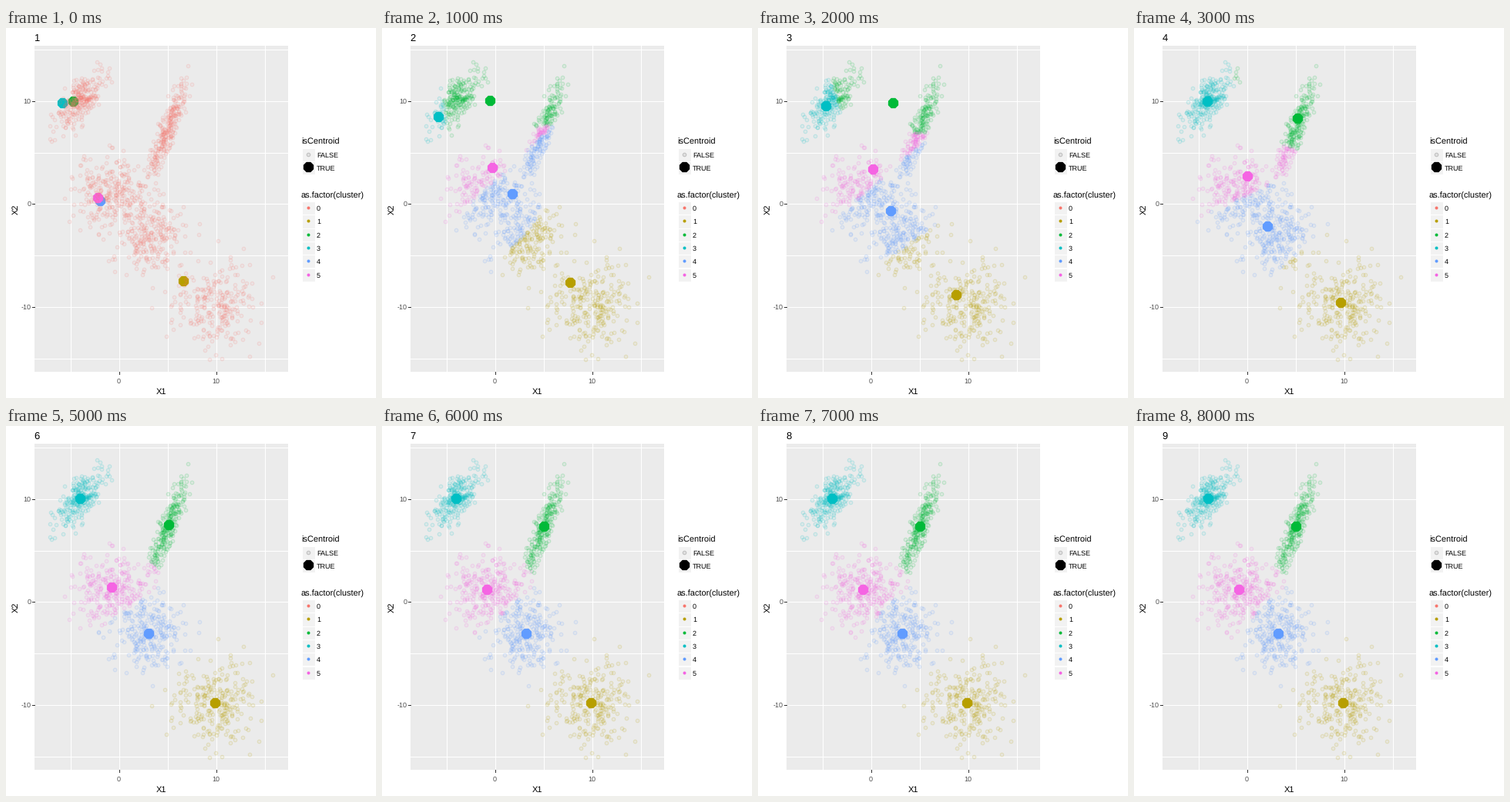
Recreate the animation shown at these times as a matplotlib script. Size 480 by 480 pixels, loop 9 s.

```python
import numpy as np
import matplotlib.pyplot as plt
from matplotlib.animation import FuncAnimation
from matplotlib.colors import to_rgba
from matplotlib.patches import Rectangle

plt.rcParams["font.family"] = "Liberation Sans"
plt.rcParams["text.hinting"] = "none"

SIZE, DPI = 480, 100
PT = 72 / DPI
STEPS = 9
COLORS = ["#F8766D", "#B79F00", "#00BA38", "#00BFC4", "#619CFF", "#F564E3"]

PER_BLOB = 270
# mean x, mean y, sd x, sd y, correlation
BLOBS = [
    (9.9, -9.85, 2.1, 2.05, 0.0),
    (4.99, 7.08, 1.0, 2.25, 0.87),
    (-3.96, 10.0, 1.2, 1.35, 0.67),
    (3.09, -3.11, 1.75, 1.7, 0.0),
    (-0.87, 1.16, 1.8, 1.6, 0.0),
]
START = [(6.65, -7.53), (-4.67, 9.93), (-5.78, 9.78), (-1.87, 0.26), (-2.14, 0.56)]


def make_blob(rng, mx, my, sx, sy, rho):
    z = rng.normal(size=(PER_BLOB * 2, 2))
    z = z[np.hypot(*z.T) < 2.95][:PER_BLOB]
    z = (z - z.mean(axis=0)) / z.std(axis=0)
    x = mx + sx * z[:, 0]
    y = my + sy * (rho * z[:, 0] + np.sqrt(1 - rho**2) * z[:, 1])
    return np.column_stack([x, y])


def k_means(points, centers):
    """Labels and centroids of every step; step 0 is still unlabelled."""
    history = [(np.zeros(len(points), int), np.array(centers))]
    for _ in range(STEPS - 1):
        gap = points[:, None] - history[-1][1][None]
        near = (gap**2).sum(axis=2).argmin(axis=1)
        means = [points[near == k].mean(axis=0) for k in range(len(centers))]
        history.append((near + 1, np.array(means)))
    return history


def to_px(p):
    p = np.asarray(p, float)
    px = np.column_stack([146.4 + 12.63 * p[:, 0], 227.8 - 13.35 * p[:, 1]])
    return np.floor(px) + 0.5


def area(diameter):
    return (diameter * PT) ** 2


def tints(color):
    """Faint fill and stronger rim of a data point."""
    return to_rgba(color, 0.07), to_rgba(color, 0.18)


def text(x, y, s, size, color="black", ha="left", **kw):
    return ax.text(x, y, s, fontsize=size * PT, color=color, ha=ha, **kw)


def line(xs, ys, color):
    ax.plot(xs, ys, color=color, lw=PT, antialiased=False,
            solid_capstyle="butt", zorder=1)


def legend_row(y, label):
    ax.add_patch(Rectangle((383.5, y - 8.6), 17.2, 17.2, fc="#F2F2F2",
                           ec="white", lw=PT, zorder=1))
    text(403, y + 3.5, label, 9)


def big_dots(xy, color):
    return ax.scatter(*np.transpose(xy), s=area(14.4), c=color, marker="8",
                      lw=0, zorder=4)


rng = np.random.default_rng(11)
points = rng.permutation(np.vstack([make_blob(rng, *b) for b in BLOBS]))
history = k_means(points, START)

fig = plt.figure(figsize=(SIZE / DPI, SIZE / DPI), dpi=DPI, facecolor="white")
ax = fig.add_axes([0, 0, 1, 1])
ax.set(xlim=(0, SIZE), ylim=(SIZE, 0))
ax.axis("off")

# panel, grid and axes
ax.add_patch(Rectangle((37, 23), 329, 423, fc="#EBEBEB", lw=0, zorder=0))
for v in range(-15, 16, 5):
    x, y = to_px([(v, v)])[0]
    line([37, 366], [y, y], "white")
    if v > -10:
        line([x, x], [23, 446], "white")
    if v % 10 == 0:
        line([34, 37], [y, y], "#333333")
        text(32.5, y + 3.5, str(v), 9, "#4D4D4D", "right")
        if v >= 0:
            line([x, x], [446, 449], "#333333")
            text(x, 461, str(v), 9, "#4D4D4D", "center")
text(201.5, 475, "X1", 11, ha="center")
text(12.5, 235, "X2", 11, ha="center", va="center", rotation=90)
title = text(36.5, 17, "1", 13)

# legends
fill, rim = tints("black")
text(383, 151, "isCentroid", 11)
legend_row(164.3, "FALSE")
legend_row(181.5, "TRUE")
ax.scatter([391.5], [163.5], s=area(4.6), lw=PT, zorder=3, fc=[fill], ec=[rim])
big_dots([(391.5, 179.8)], "black")

text(383, 221, "as.factor(cluster)", 11)
for i, c in enumerate(COLORS):
    y = 233.7 + 17.28 * i
    legend_row(y, str(i))
    ax.scatter([391.5], [np.floor(y) - 0.5], s=area(4), c=c, lw=0, zorder=3)

# data
centers = big_dots(to_px(START), COLORS[1:])
dots = ax.scatter(*to_px(points).T, s=area(4.6), lw=PT, zorder=5)
fills, rims = (np.array(t) for t in zip(*map(tints, COLORS)))


def update(step):
    labels, means = history[step]
    dots.set_facecolor(fills[labels])
    dots.set_edgecolor(rims[labels])
    centers.set_offsets(to_px(means))
    title.set_text(str(step + 1))
    return dots, centers, title


anim = FuncAnimation(fig, update, frames=STEPS, interval=1000,
                     repeat=True, repeat_delay=0)
plt.show()
```
